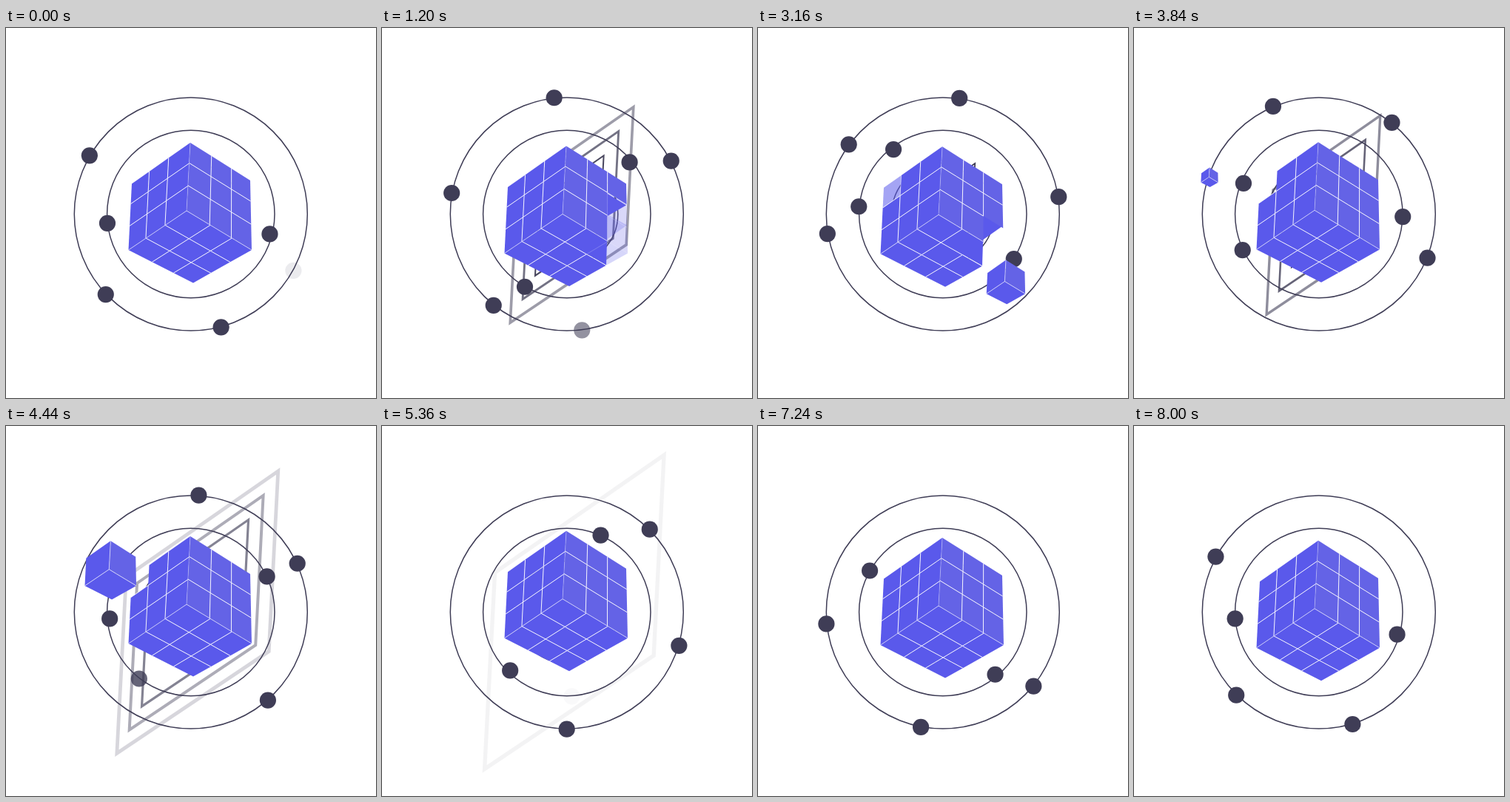
Write an HTML page with a canvas that moves like this. It is 500 px wide and 500 px high and loops after 8.04 s.

```html
<!DOCTYPE html>
<html lang="en">
<head>
<meta charset="utf-8">
<title>Cube in orbit</title>
<style>
html, body { margin: 0; width: 100%; height: 100%; overflow: hidden; background: #fff; }
canvas { display: block; width: 500px; height: 500px; }
</style>
</head>
<body>
<canvas id="stage" width="500" height="500"></canvas>
<script>
const ctx = document.getElementById('stage').getContext('2d');
const LOOP = 8040, CX = 249.8, CY = 251.5;
const DARK = '#3f3d56', BLUE = '#5a59eb', LIGHT = '#6463e6';

const clamp = x => Math.max(0, Math.min(1, x));
const ramp = (t, from, to) => clamp((t - from) / (to - from));
const mix = (p, q, k) => p.map((v, i) => v + (q[i] - v) * k);

function trace(points, close) {
  ctx.beginPath();
  points.forEach(p => ctx.lineTo(...p));
  if (close) ctx.closePath();
}

function fill(points, color) {
  trace(points, true);
  ctx.fillStyle = color;
  ctx.fill();
}

function seam(a, b, width) {
  trace([a, b]);
  ctx.strokeStyle = '#fff';
  ctx.lineWidth = width;
  ctx.stroke();
}

function drawRing(r) {
  ctx.strokeStyle = DARK;
  ctx.lineWidth = 1.5;
  ctx.beginPath();
  ctx.arc(CX, CY, r, 0, 7);
  ctx.stroke();
}

function drawDot(t, r, start, dir, opacity = 1) {
  const a = (start + dir * 360 * t / LOOP) * Math.PI / 180;
  ctx.fillStyle = DARK;
  ctx.globalAlpha = opacity;
  ctx.beginPath();
  ctx.arc(CX + r * Math.cos(a), CY + r * Math.sin(a), 11.1, 0, 7);
  ctx.fill();
  ctx.globalAlpha = 1;
}

function drawOrbits(t) {
  [157.5, 113.2, 69].forEach(drawRing);
  for (const angle of [210, 136.6, 75]) drawDot(t, 158.2, angle, 1);
  drawDot(t, 113.5, 173.8, -1);
  drawDot(t, 110, 14.2, -1);
  // Visiting dots fade in and out
  drawDot(t, 158.2, 28.8, 1, ramp(t, -270, 2350) - ramp(t, 3650, 3800));
  drawDot(t, 158.2, 279.2, 1, ramp(t, 0, 1000) - ramp(t, 1500, 1650));
  drawDot(t, 114, 326.7, -1, ramp(t, 1600, 2800) - ramp(t, 4200, 5400));
}

// Two bursts of three expanding frames behind the cube
function drawPulses(t) {
  ctx.strokeStyle = DARK;
  for (const burst of [430, 3190]) for (let i = 0; i < 3; i++) {
    const s = 42 + 0.0535 * (t - burst - 345 * i);
    if (s < 20 || s > 126.5) continue;
    const x = 249.2 + 0.088 * s, y = 255 - 0.03 * s;
    const corners = [[1, -1.75], [0.885, 0.485], [-1, 1.75], [-0.885, -0.44]];
    trace(corners.map(p => [x + p[0] * s, y + p[1] * s]), true);
    ctx.globalAlpha = clamp((126.5 - s) / 85);
    ctx.lineWidth = 0.044 * s;
    ctx.stroke();
  }
  ctx.globalAlpha = 1;
}

// Cube corners around its centre
const T = [0, -95], R = [81, -44], RB = [83, 50], B = [4, 94.5],
      LB = [-83.5, 50], L = [-79, -39.5], C = [-5, -3];
// Quad from origin along u and v; gu and gv are the perspective along each
const FACES = {
  left: { quad: [T, L, LB, C], gu: 0.85, gv: 1.15, color: BLUE, rim: [0.6, 0] },
  right: { quad: [T, R, RB, C], gu: 0.91, gv: 1.18, color: LIGHT, rim: [0.3, 0] },
  bottom: { quad: [C, RB, B, LB], gu: 0.87, gv: 0.86, color: BLUE, rim: [0.6, 0.6] }
};
const spot = (k, n, g) => k / (k + (n - k) * g);

// Draws one face as n by n cells
function drawFace(name, n, opacity = {}) {
  const { quad: [a, b, c, d], gu, gv, color, rim } = FACES[name];
  const at = (i, j) => {
    const u = spot(i, n, gu), v = spot(j, n, gv);
    return mix(mix(a, b, u), mix(d, c, u), v);
  };
  for (let j = 0; j < n; j++) for (let i = 0; i < n; i++) {
    const p = at(i, j), q = at(i + 1, j), r = at(i, j + 1);
    ctx.globalAlpha = opacity[name + i + j] ?? 1;
    fill([p, q, at(i + 1, j + 1), r], color);
    const across = i ? 0.9 : name == 'left' ? 0 : rim[0];
    const along = j ? 0.9 : rim[1];
    if (across) seam(p, r, across);
    if (along) seam(p, q, along);
  }
  ctx.globalAlpha = 1;
}

// Cells that fade out, then are refilled by a small cube flying along a curve
const PIECES = [
  { cells: ['right21'], fade: 600, from: 1500, to: 2700,
    path: [[404, 220], [341, 341], [318, 273]] },
  { cells: ['right22', 'bottom20'], fade: 600, from: 3000, to: 3620,
    path: [[340, 358], [331, 331], [317, 296]] },
  { cells: ['left20'], fade: 2800, from: 3700, to: 4820,
    path: [[97, 208], [114, 180], [181, 207]] }
];

function drawCube(t) {
  const opacity = {};
  for (const { cells, fade, to } of PIECES)
    for (const cell of cells)
      opacity[cell] = 1 - ramp(t, fade, fade + 800) + ramp(t, to - 100, to);
  const bob = 9.8 * ramp(t, 0, 2653) - 23.4 * ramp(t, 2653, 5306) + 13.6 * ramp(t, 5306, LOOP);
  ctx.save();
  ctx.translate(249, 250 + bob);
  // Inner sides seen through the gaps
  if (opacity.right22 < 1) {
    fill([[55, -31], [81, -15], [55, 0]], BLUE);
    fill([[26, 50], [55, 34], [54, 66]], BLUE);
    ctx.globalAlpha = opacity.right21;
    fill([[55, -3], [82, 12], [55, 31]], BLUE);
  }
  for (const name in FACES) drawFace(name, 3, opacity);
  ctx.restore();
}

function drawFlights(t) {
  for (const { from, to, path: [a, b, c] } of PIECES) {
    if (t < from || t > to) continue;
    const k = ramp(t, from, to);
    const size = Math.min(1, 3 * k) * (1 + 0.29 * Math.sin(Math.PI * k)) / 3;
    ctx.save();
    ctx.translate(...mix(mix(a, b, k), mix(b, c, k), k));
    ctx.scale(size, size);
    for (const name in FACES) drawFace(name, 1);
    // Edges meeting at the front corner
    for (const p of [T, LB, RB]) seam(C, p, 0.5 / size);
    ctx.restore();
  }
}

const begin = performance.now();
function draw(now) {
  const t = Math.max(0, now - begin) % LOOP;
  ctx.fillStyle = '#fff';
  ctx.fillRect(0, 0, 500, 500);
  drawPulses(t);
  drawOrbits(t);
  drawCube(t);
  drawFlights(t);
  requestAnimationFrame(draw);
}
draw(begin);
</script>
</body>
</html>
```
